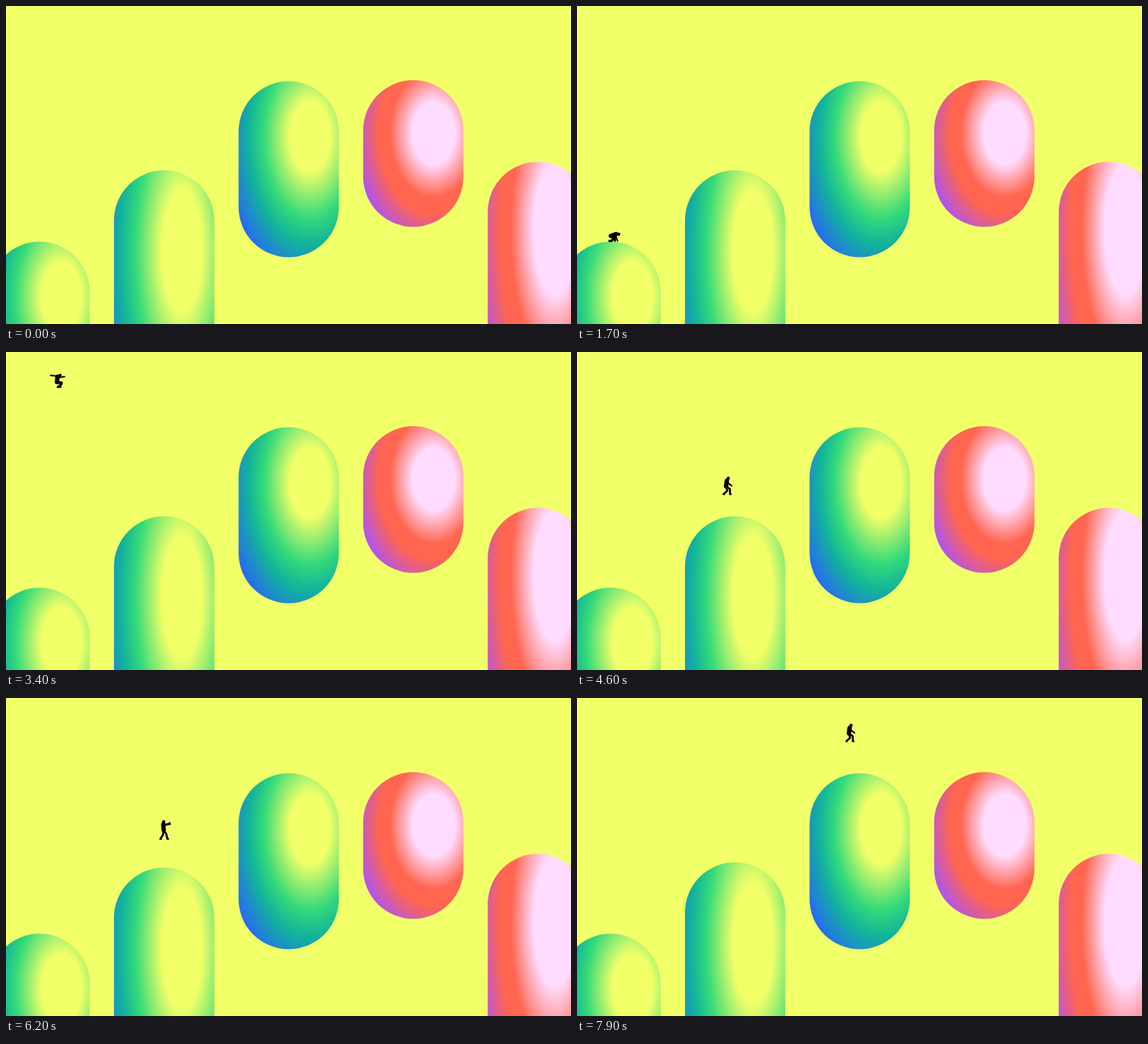
An HTML page with a canvas that plays this animation: 800x450 px, repeating every 8 s.

```html
<!DOCTYPE html>
<html lang="en">
<head>
<meta charset="utf-8">
<title>Leaping over pills</title>
<style>
  html, body { margin: 0; width: 100%; height: 100%; overflow: hidden; background: #f1ff68; }
  canvas { display: block; width: 800px; height: 450px; }
</style>
</head>
<body>
<canvas id="stage" width="800" height="450"></canvas>
<script>
const ctx = document.getElementById('stage').getContext('2d');
const LOOP = 8000, STEP = 100, WIDE = 142, GAP = 176.4, ENTER = 900;
const YELLOW = '#f1ff68';
const pillX = i => -23.5 + GAP * i;
const centre = i => pillX(i) + WIDE / 2;

const cool = [[0.2, YELLOW], [0.46, '#35da79'], [0.61, '#12b49a'], [0.87, '#2a60ff']];
const warm = [[0.21, '#ffdcff'], [0.44, '#ff654f'], [0.55, '#ff654f'], [0.8, '#a953fb']];

// cx, cy: middle of the glow; tall: its height for a width of WIDE
const pills = [
  { top: 333.5, h: 260, cx: 78.5, cy: 411, tall: 245, stops: cool },
  { top: 232.5, h: 430, cx: 249, cy: 347, tall: 430, stops: cool },
  { top: 106.5, h: 249, cx: 430.5, cy: 185, tall: 249, stops: cool },
  { top: 105, h: 207.5, cx: 605.5, cy: 180, tall: 207.5, stops: warm },
  { top: 220.5, h: 450, cx: 777, cy: 317, tall: 430, stops: warm }
];

// Hop n lands on pill n; heights are those of the feet
const hops = [
  { start: -920, mid: 207, land: 1135, from: 434, apex: 123, to: 334, rise: 2, drift: 2 },
  { start: 2615, mid: 3742, land: 4670, from: 334, apex: 22, to: 233, rise: 2, drift: 2 },
  { start: 6165, mid: 7300, land: 8017, from: 233, apex: -42, to: 107, rise: 4, drift: 1.3 }
];

// Angles in degrees, clockwise from straight up
const poses = {
  walk:   { hipX: -1, hipY: -12.6, lean: 8, nod: 30, front: 135, back: 190, feet: 0, stride: 4.6 },
  low:    { hipX: 0.5, hipY: -8.5, lean: 70, nod: 92, front: 165, back: 185, feet: -0.5, stride: 1.3 },
  bend:   { hipX: -0.5, hipY: -11, lean: 50, nod: 65, front: 170, back: 200, feet: 0, stride: 1 },
  reach:  { hipX: -1.6, hipY: -14, lean: -5, nod: 8, front: 86, back: 75, feet: -1.4, stride: 5 },
  spread: { hipX: -1, hipY: -8.2, lean: 5, nod: 60, front: 88, back: -78, feet: 1.4, stride: 1.6 }
};
// Poses by share of the time in the air and on a pill
const flight = [[0, 'reach'], [0.1, 'reach'], [0.38, 'spread'], [0.8, 'spread'], [0.93, 'walk'], [1, 'walk']];
const rest = [[0, 'walk'], [0.1, 'low'], [0.38, 'low'], [0.55, 'bend'], [0.78, 'low'], [1, 'reach']];

function poseAt(keys, p) {
  const i = keys.findIndex(([at]) => at > p);
  const [t0, a] = keys[i - 1], [t1, b] = keys[i];
  const q = (p - t0) / (t1 - t0), mixed = {};
  for (const k in poses[a]) mixed[k] = poses[a][k] + (poses[b][k] - poses[a][k]) * q;
  return mixed;
}

// A ringing wobble after the landing, one push before the take-off
function dip(i, t) {
  if (i > 1) return 0;
  const since = t - hops[i].land, push = t - hops[i + 1].start + 280;
  if (push > 0 && push < 400) return 12 * Math.sin(Math.PI * push / 400);
  if (since > 0 && since < 560) return 15 * Math.sin(since / 80) * Math.exp(-since / 150);
  return 0;
}

function jumper(t) {
  const n = hops.findLastIndex(hop => t >= hop.start), hop = hops[n];
  if (t >= hop.land) {
    const p = (t - hop.land) / (hops[n + 1].start - hop.land);
    return { x: centre(n), y: pills[n].top + dip(n, t) + 0.4, pose: poseAt(rest, p) };
  }
  const p = (t - hop.start) / (hop.land - hop.start);
  const y = t < hop.mid
    ? hop.apex + (hop.from - hop.apex) * ((hop.mid - t) / (hop.mid - hop.start)) ** hop.rise
    : hop.apex + (hop.to - hop.apex) * ((t - hop.mid) / (hop.land - hop.mid)) ** 2;
  return { x: centre(n - 1) + GAP * p ** hop.drift, y, pose: poseAt(flight, p) };
}

function drawPill(pill, i, t) {
  ctx.save();
  ctx.translate(0, dip(i, t));
  ctx.beginPath();
  ctx.roundRect(pillX(i), pill.top, WIDE, pill.h, WIDE / 2);
  ctx.translate(pill.cx, pill.cy);
  ctx.scale(1, pill.tall / WIDE);
  const glow = ctx.createRadialGradient(0, 0, 0, 0, 0, WIDE);
  pill.stops.forEach(([at, color]) => glow.addColorStop(at, color));
  ctx.fillStyle = glow;
  ctx.fill();
  ctx.restore();
}

function limb(width, ...points) {
  ctx.lineWidth = width;
  ctx.beginPath();
  points.forEach(([x, y]) => ctx.lineTo(x, y));
  ctx.stroke();
}

function reachFrom([x, y], degrees, length) {
  const a = degrees * Math.PI / 180;
  return [x + Math.sin(a) * length, y - Math.cos(a) * length];
}

// The knee bends forward as far as the leg length asks
function leg(hip, foot) {
  const dx = foot[0] - hip[0], dy = foot[1] - hip[1], far = Math.hypot(dx, dy);
  const out = Math.sqrt(Math.max(0, 49 - far * far / 4)) / far;
  const knee = [(hip[0] + foot[0]) / 2 + dy * out, (hip[1] + foot[1]) / 2 - dx * out];
  limb(2.8, hip, knee, foot, [foot[0] + 1, foot[1]]);
}

function arm(shoulder, degrees) {
  const elbow = reachFrom(shoulder, degrees + 8, 5);
  limb(2.1, shoulder, elbow, reachFrom(elbow, degrees - 8, 5));
}

function drawJumper(t) {
  const { x, y, pose } = jumper(t);
  const hip = [pose.hipX, pose.hipY];
  const shoulder = reachFrom(hip, pose.lean, 7.4);
  const head = reachFrom(shoulder, pose.nod, 4.4);
  ctx.save();
  ctx.translate(x, y);
  ctx.strokeStyle = '#000';
  ctx.lineCap = ctx.lineJoin = 'round';
  limb(6.2, hip, shoulder);
  limb(4.4, shoulder, head);
  leg(hip, [pose.feet - pose.stride, -1.2]);
  leg(hip, [pose.feet + pose.stride, -1.2]);
  arm(shoulder, pose.front);
  arm(shoulder, pose.back);
  ctx.restore();
}

function draw(t) {
  ctx.fillStyle = YELLOW;
  ctx.fillRect(0, 0, 800, 450);
  pills.forEach((pill, i) => drawPill(pill, i, t));
  if (t >= ENTER) drawJumper(t);
}

const begin = performance.now();
function tick(now) {
  const t = Math.max(0, now - begin) % LOOP;
  draw(Math.floor(t / STEP) * STEP);
  requestAnimationFrame(tick);
}
draw(0);
requestAnimationFrame(tick);
</script>
</body>
</html>
```
